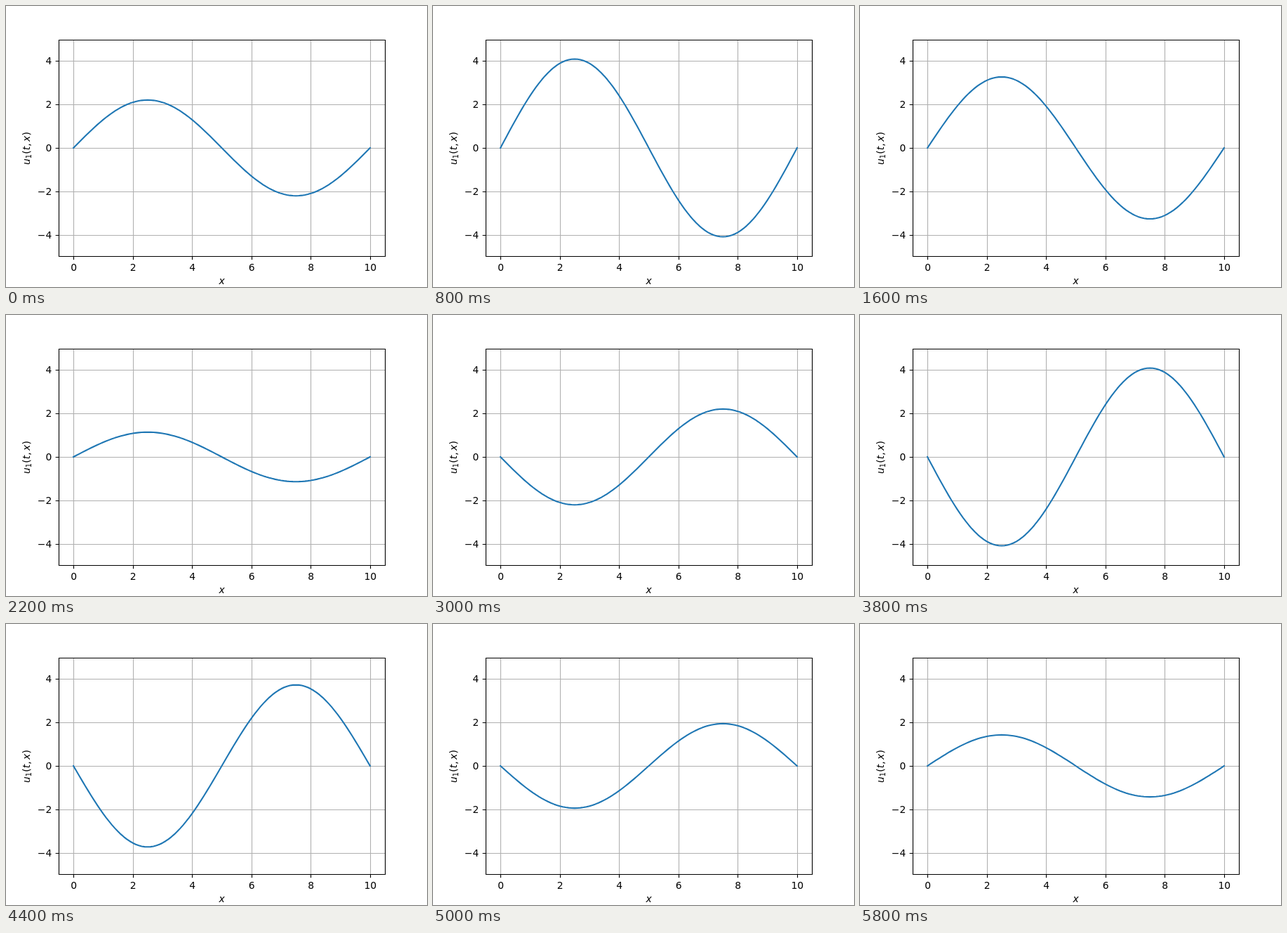
Recreate the animation shown at these times as an HTML page. Size 600x400 px, loop 6 s.

```html
<!DOCTYPE html>
<html lang="en">
<head>
<meta charset="utf-8">
<title>Standing wave</title>
<style>
  html, body { margin: 0; width: 100%; height: 100%; overflow: hidden; background: #fff; }
  svg { display: block; width: 600px; height: 400px; }
  text { font: 13.89px "DejaVu Sans", sans-serif; fill: #000; }
  .italic { font-style: italic; }
  .sub { font-size: 9.72px; }
  path { fill: none; stroke: #000; stroke-width: 1.11; }
  #grid { stroke: #b0b0b0; }
  #wave { stroke: #1f77b4; stroke-width: 2.08; stroke-linecap: square; stroke-linejoin: round; }
</style>
</head>
<body>
<svg viewBox="0 0 600 400">
  <path id="grid"/>
  <path id="ticks"/>
  <path id="wave"/>
  <path d="M75.5 48.5H540.5V356.5H75.5Z"/>
  <g id="labels"></g>
  <text class="italic" x="307.5" y="396" text-anchor="middle">x</text>
  <g transform="translate(33.5 226) rotate(-90)">
    <text class="italic" x="0" y="0">u</text>
    <text class="sub" x="8.8" y="2">1</text>
    <text x="15.3" y="0">(</text>
    <text class="italic" x="20.7" y="0">t</text>
    <text x="26.2" y="0">,</text>
    <text class="italic" x="33.1" y="0">x</text>
    <text x="41.4" y="0">)</text>
  </g>
</svg>
<script>
  const LOOP = 6000, STEP = 200, SAMPLES = 100;
  const LEFT = 96.14, WIDTH = 422.73, MIDDLE = 202;
  const COS_AMP = 68.2, SIN_AMP = 108.8; // pixels
  const byId = id => document.getElementById(id);
  const snap = v => Math.round(v) + 0.5;

  function addLabel(x, y, value, anchor) {
    const label = document.createElementNS("http://www.w3.org/2000/svg", "text");
    label.setAttribute("x", x);
    label.setAttribute("y", y);
    label.setAttribute("text-anchor", anchor);
    label.textContent = String(value).replace("-", "\u2212");
    byId("labels").append(label);
  }

  function drawAxes() {
    let grid = "", ticks = "";
    for (let value = 0; value <= 10; value += 2) {
      const x = LEFT + WIDTH * value / 10;
      grid += `M${snap(x)} 48.5V356.5`;
      ticks += `M${snap(x)} 356.5v4.86`;
      addLabel(x + 0.4, 377, value, "middle");
    }
    for (let value = -4; value <= 4; value += 2) {
      const y = MIDDLE - 30.92 * value;
      grid += `M75.5 ${snap(y)}H540.5`;
      ticks += `M75.5 ${snap(y)}h-4.86`;
      addLabel(65.3, Math.round(y) + 5, value, "end");
    }
    byId("grid").setAttribute("d", grid);
    byId("ticks").setAttribute("d", ticks);
  }

  function drawWave(time) {
    const phase = 2 * Math.PI * Math.floor(time % LOOP / STEP) * STEP / LOOP;
    const amp = COS_AMP * Math.cos(phase) + SIN_AMP * Math.sin(phase);
    const points = Array.from({ length: SAMPLES + 1 }, (_, i) => {
      const s = i / SAMPLES;
      const y = MIDDLE - amp * Math.sin(2 * Math.PI * s);
      return `${(LEFT + WIDTH * s).toFixed(2)} ${y.toFixed(2)}`;
    });
    byId("wave").setAttribute("d", "M" + points.join("L"));
  }

  function tick() {
    drawWave(performance.now() - start);
    requestAnimationFrame(tick);
  }

  drawAxes();
  const start = performance.now();
  tick();
</script>
</body>
</html>
```
